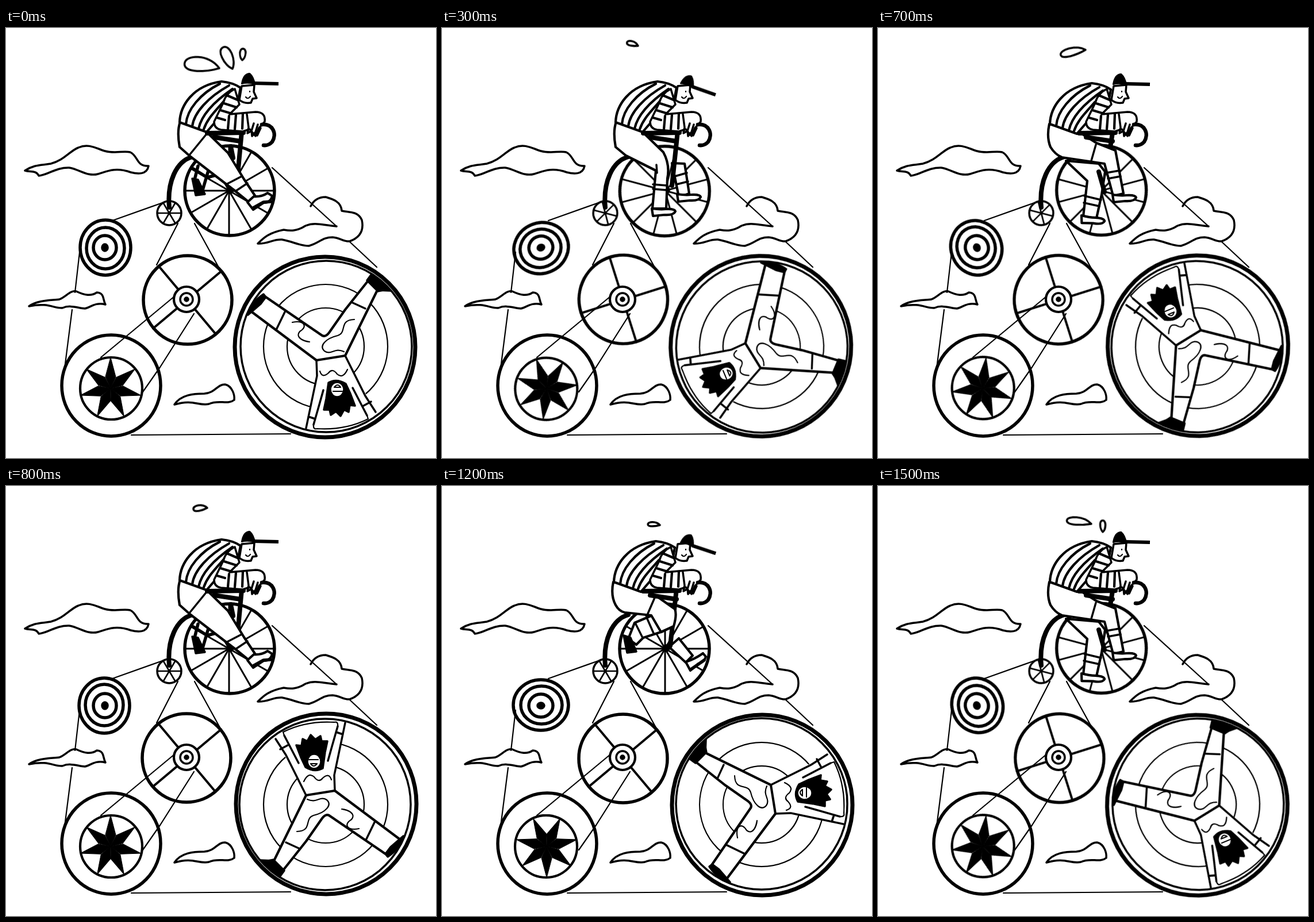
These frames come from a looping animation (748 by 748 pixels, 1.6 s). An HTML page without scripts:

```html
<!DOCTYPE html>
<html lang="en">
<head>
<meta charset="utf-8">
<title>Pedal machine</title>
<style>
html, body { margin: 0; width: 100%; height: 100%; overflow: hidden; background: #fff; }
svg { display: block; width: 100vw; height: 100vh; fill: none; stroke: #000; stroke-width: 3.5; stroke-linecap: round; stroke-linejoin: round; }
.white { fill: #fff; }
.black { fill: #000; }
.thin { stroke-width: 2.2; }
.mid-line { stroke-width: 4.2; }
.bold { stroke-width: 5.5; }
.bar { stroke-width: 8; }

.turn { animation: turn 1.6s steps(16) infinite; }
.back { animation-name: back; }
.fast { animation-duration: .8s; animation-timing-function: steps(8); }
@keyframes turn { to { transform: rotate(360deg); } }
@keyframes back { to { transform: rotate(-360deg); } }

.pose { visibility: hidden; animation: pose .8s step-end infinite; animation-delay: calc(var(--i) * .2s - .8s); }
@keyframes pose { 0% { visibility: visible; } 25%, 100% { visibility: hidden; } }

.shirt { animation: slump .8s step-end infinite; }
@keyframes slump { 0% { transform: none; } 50%, 100% { transform: translate(-3px, 3px); } }

.cap { transform-origin: 412px 100px; animation: nod .8s step-end infinite; }
@keyframes nod {
  0% { transform: none; }
  12.5% { transform: translate(1px, 1px) rotate(7deg); }
  25% { transform: translate(4px, -1px) rotate(14deg); }
  37.5% { transform: translate(4px, 0) rotate(18deg); }
  50% { transform: translate(4px, 2px) rotate(17deg); }
  62.5% { transform: translate(2px, 3px) rotate(8deg); }
  75% { transform: translate(0, 2px) rotate(3deg); }
  87.5% { transform: translate(-1px, 1px); }
}

.drop { vector-effect: non-scaling-stroke; animation: 1.6s step-end infinite; }
.left { animation-name: left; }
.mid { animation-name: mid; }
.right { animation-name: right; }
@keyframes left {
  0% { transform: translate(371px, 70px) rotate(3deg) scale(1.52); }
  6.25% { transform: translate(354px, 58px) rotate(8deg) scale(1.2); }
  12.5% { transform: translate(347px, 42px) rotate(12deg) scale(.8); }
  18.75% { transform: translate(341px, 31px) rotate(12deg) scale(.5); }
  25% { transform: scale(0); }
  37.5% { transform: translate(368px, 48px) rotate(-8deg) scale(.9); }
  43.75% { transform: translate(361px, 38px) rotate(-15deg) scale(1.1, .85); }
  50% { transform: translate(350px, 38px) rotate(-10deg) scale(.6); }
  56.25% { transform: scale(0); }
  75% { transform: translate(379px, 68px) scale(.52, .45); }
  81.25% { transform: translate(376px, 67px) rotate(2deg) scale(.7, .6); }
  87.5% { transform: translate(373px, 66px) rotate(4deg) scale(.9, .7); }
  93.75% { transform: translate(371px, 66px) rotate(5deg) scale(1.07, .8); }
}
@keyframes mid {
  0% { transform: translate(394px, 71px) rotate(65deg) scale(1.02); }
  6.25% { transform: translate(386px, 50px) rotate(58deg) scale(.9); }
  12.5% { transform: translate(377px, 32px) rotate(55deg) scale(.55); }
  18.75% { transform: scale(0); }
  25% { transform: translate(399px, 76px) rotate(50deg) scale(.7); }
  31.25% { transform: translate(395px, 62px) rotate(42deg) scale(1.08, .85); }
  37.5% { transform: translate(385px, 52px) rotate(42deg) scale(.7); }
  43.75% { transform: scale(0); }
  62.5% { transform: translate(402px, 85px) rotate(55deg) scale(.5); }
  68.75% { transform: translate(395px, 66px) rotate(50deg) scale(.5); }
  75% { transform: scale(0); }
  93.75% { transform: translate(391px, 80px) rotate(88deg) scale(.5); }
}
@keyframes right {
  0% { transform: translate(411px, 56px) rotate(94deg) scale(.5); }
  6.25% { transform: translate(413px, 42px) rotate(94deg) scale(.4); }
  12.5%, 100% { transform: scale(0); }
}
</style>
</head>
<body>
<svg viewBox="0 0 748 748">
  <defs>
    <path id="ray" d="M0-54L9-20L0 0L-9-20Z"/>
    <path id="cross" d="M0-77V77M-77 0H77"/>
    <path id="shoe" class="white" d="M0 0Q14 2 24 1Q40 0 41 5Q38 12 22 11L2 13Z"/>
  </defs>

  <!-- clouds -->
  <path d="M33 248C50 237 62 239 78 236C100 231 112 213 126 208C144 200 158 210 172 214C190 219 204 213 216 216C230 222 226 241 248 240C245 256 228 254 217 251C190 241 174 250 160 254C142 259 128 246 110 243C88 242 72 256 57 257C52 247 43 251 33 248Z"/>
  <path d="M575 345C550 343 538 337 521 344C506 354 494 353 483 351C458 356 449 364 438 375C456 376 464 367 480 368C500 372 512 379 527 379C545 374 550 364 568 364C582 365 587 372 598 371C620 363 622 348 619 334C612 318 596 321 584 318C583 301 566 297 556 294C541 294 534 302 530 310"/>
  <path d="M40 484C55 473 80 474 93 472C105 467 112 456 122 458C137 465 148 467 158 460C172 461 168 473 173 481C155 476 146 487 137 488C124 487 112 481 98 487C83 488 74 477 40 484Z"/>
  <path d="M293 655C304 638 326 636 345 636C364 635 367 620 381 620C394 623 398 639 397 647C386 656 370 646 353 654C335 658 326 645 293 655Z"/>

  <!-- belts -->
  <path class="thin" d="M463 243L575 345M598 372L645 416M185 335L275 303M128 390L120 460M115 490L102 592M218 708L495 706M299 340L262 412M328 340L372 420"/>

  <!-- ringed pulley -->
  <g transform="translate(172 382)">
    <g class="turn">
      <ellipse class="bold" cx="1" rx="44" ry="48"/>
      <ellipse class="bold" cx="1" cy="1" rx="33" ry="36"/>
      <ellipse class="bold" rx="20" ry="21"/>
      <ellipse class="black" rx="5" ry="6"/>
    </g>
  </g>

  <!-- four-spoke wheel -->
  <g transform="translate(315 473)">
    <g class="turn back">
      <circle class="bold" cx="1" r="77"/>
      <use href="#cross" transform="rotate(50)" stroke-width="4"/>
    </g>
  </g>

  <!-- star wheel -->
  <ellipse class="bold" cx="183" cy="622" rx="86" ry="88"/>
  <g transform="translate(182 627)">
    <g class="turn fast">
      <circle class="mid-line" cx="1" r="54"/>
      <g class="black" stroke-width="1">
        <use href="#ray"/>
        <use href="#ray" transform="rotate(51.43)"/>
        <use href="#ray" transform="rotate(102.86)"/>
        <use href="#ray" transform="rotate(154.29)"/>
        <use href="#ray" transform="rotate(205.71)"/>
        <use href="#ray" transform="rotate(257.14)"/>
        <use href="#ray" transform="rotate(308.57)"/>
      </g>
    </g>
  </g>
  <path class="thin" d="M165 573L300 461M238 633L268 590L327 497"/>
  <circle class="white mid-line" cx="314" cy="472" r="22"/>
  <circle cx="314" cy="472" r="11"/>
  <circle class="black" cx="314" cy="472" r="3"/>

  <!-- acrobat in the big wheel -->
  <g transform="translate(556 554)">
    <g class="turn">
      <circle class="white" cx="-1" cy="1" r="157" stroke-width="7"/>
      <circle cx="1" r="149"/>
      <circle class="thin" r="108"/>
      <circle class="thin" r="67"/>
      <g transform="translate(-556 -554)">
        <path class="white" stroke="none" d="M540 578L590 570L643 668Q590 704 523 694L540 605Z"/>
        <path class="white mid-line" d="M540 578L425 492L449 466L550 535Q556 538 562 530L590 490L632 437L660 455L645 458L590 570Z"/>
        <path class="black" d="M421 499Q428 476 448 463L452 468L443 480ZM628 439L636 428L669 457L645 456Z"/>
        <path d="M470 525L486 492M601 477L625 488"/>
        <path class="thin" d="M498 512C518 508 526 519 511 528C502 539 519 545 528 546M606 507C578 508 594 530 577 535C556 540 544 553 554 562C566 570 571 555 588 563"/>
        <path d="M540 578L541 605L522 696M552 630L545 655L535 690M590 570L625 640L643 668M603 626L628 674M526 676L538 680M622 657L635 650"/>
        <path class="thin" d="M546 597Q550 610 561 600Q568 591 576 602Q586 611 594 594M535 690Q534 699 541 697Q590 700 630 680L628 674"/>
        <path class="black" d="M561 617Q575 609 591 619L599 636L607 657L598 656L596 668L588 664L582 675L574 667L565 673L563 664L553 664L557 645Z"/>
        <ellipse class="white" cx="576" cy="629" rx="12" ry="13"/>
        <path class="thin" d="M569 632L585 632M571 625Q577 617 582 625Z"/>
      </g>
    </g>
  </g>

  <!-- penny-farthing -->
  <path class="bar" d="M284 312C280 268 296 232 324 224"/>
  <g transform="translate(284 322)">
    <g class="turn fast">
      <circle r="21"/>
      <path d="M-20 0H20M-10-17L10 17M10-17L-10 17" stroke-width="2.6"/>
    </g>
  </g>
  <g transform="translate(388 283)">
    <g class="turn fast">
      <circle class="bold" cx="1" r="78"/>
      <g stroke-width="3">
        <use href="#cross"/>
        <use href="#cross" transform="rotate(30)"/>
        <use href="#cross" transform="rotate(60)"/>
      </g>
    </g>
  </g>
  <circle class="black" cx="390" cy="282" r="5"/>

  <!-- legs -->
  <g class="pose" style="--i:0">
    <path class="bold" d="M326 245L350 260L372 254M334 240L328 264M352 248L342 282"/>
    <path class="black" d="M324 262L334 264L346 289L330 291Z"/>
    <path class="bar" d="M411 170L404 245M391 206L395 226"/>
    <path class="white mid-line" d="M303 163Q297 180 302 207L320 223L381 270L398 283L425 305L434 293L414 263L386 217L348 180Z"/>
    <path d="M319 221L350 183M383 272L410 258M399 284L420 270"/>
    <path class="white mid-line" d="M420 303L431 293Q445 294 455 287L463 292Q461 304 448 304L430 316Z"/>
    <path class="bold" d="M430 313L448 303L461 302"/>
  </g>
  <g class="pose" style="--i:1">
    <path class="white mid-line" d="M400 235L412 294L430 288L422 236Z"/>
    <path d="M405 258L426 252M408 272L428 267"/>
    <use class="mid-line" href="#shoe" x="409" y="289"/>
    <path class="bar" d="M411 170L400 274"/>
    <path class="white mid-line" d="M303 163Q297 180 302 207L320 222L372 248L366 314L390 314L392 262Q397 238 385 216L348 180Z"/>
    <path d="M373 238L374 252M367 272L391 274M367 280L391 282"/>
    <use class="mid-line" href="#shoe" x="365" y="314"/>
  </g>
  <g class="pose" style="--i:2">
    <path class="white mid-line" d="M395 280L424 307L436 295L412 265Z"/>
    <path class="white mid-line" d="M424 306Q440 301 454 291L459 297Q456 307 446 309L432 321Z"/>
    <path class="bold" d="M433 319L456 303"/>
    <path class="bar" d="M409 170L397 278"/>
    <path class="white mid-line" d="M368 224L335 238L324 266L338 276L350 264L384 253Z"/>
    <path d="M336 238L349 264M357 231L368 256"/>
    <path class="black" d="M316 260L328 264L338 288L322 290Z"/>
    <path class="white mid-line" d="M298 167Q293 190 302 207Q308 218 318 220L364 225L381 254L403 244Q409 224 405 214L371 190L348 180Z"/>
    <path d="M371 192L358 222"/>
  </g>
  <g class="pose" style="--i:3">
    <path class="white mid-line" d="M327 231L364 266L357 328L380 331L389 290L395 250L384 236Z"/>
    <path d="M359 292L388 299M358 304L385 310"/>
    <use class="mid-line" href="#shoe" x="354" y="326" transform="rotate(7 354 326)"/>
    <path class="bar" d="M410 170L402 220M384 250L394 285"/>
    <path class="white mid-line" d="M298 167Q293 190 300 207Q308 220 320 225L394 236L409 292L427 288L413 213L380 200L348 180Z"/>
    <path d="M379 203L371 231M397 252L420 248M400 262L422 258"/>
    <use class="mid-line" href="#shoe" x="408" y="290"/>
  </g>

  <!-- torso, arm and handlebar -->
  <path class="bar" d="M350 183L413 182M362 190L408 197"/>
  <g class="shirt mid-line">
    <path class="white" d="M302 164C303 135 325 100 375 93Q395 95 408 104L403 130L374 152L349 181Z"/>
    <path d="M313 167C315 142 338 114 372 97M324 171C327 147 352 120 388 100M335 175C340 152 362 128 394 106M344 176C350 158 362 147 380 126"/>
  </g>
  <path class="white" d="M398 106Q382 114 378 130L362 163Q362 175 374 177L412 180L424 176L434 188L440 174L450 163Q452 146 434 146L389 150L406 133Z"/>
  <path class="mid-line" d="M384 117L405 126M379 131L401 138M373 143L393 149M367 156L381 160M388 153L386 176M400 151L398 176M412 149L411 175"/>
  <path d="M419 150L422 173L420 183L427 179L428 188L434 181L437 187L443 174M431 166L427 179M438 168L434 181"/>
  <path d="M445 168C464 166 472 184 463 198Q457 205 448 204" stroke-width="6.5"/>

  <!-- head -->
  <path class="white" d="M410 101L406 125Q414 132 426 130L429 123L436 122L431 111L432 99Z"/>
  <path class="thin" d="M417 120Q421 125 425 119M424 110V111"/>
  <g class="cap">
    <path class="black thin" d="M410 97Q413 79 424 79Q431 85 433 98Q421 94 410 97Z"/>
    <path d="M431 96L474 97" stroke-width="6" stroke-linecap="butt"/>
  </g>

  <!-- sweat -->
  <path class="drop left" d="M0 0C-12-16-40-14-40-3S-14 5 0 0Z"/>
  <path class="drop mid" d="M0 0C-10-12-40-14-40-1S-12 10 0 0Z"/>
  <path class="drop right" d="M0 0C-10-12-40-14-40 0S-10 12 0 0Z"/>
</svg>
</body>
</html>
```
